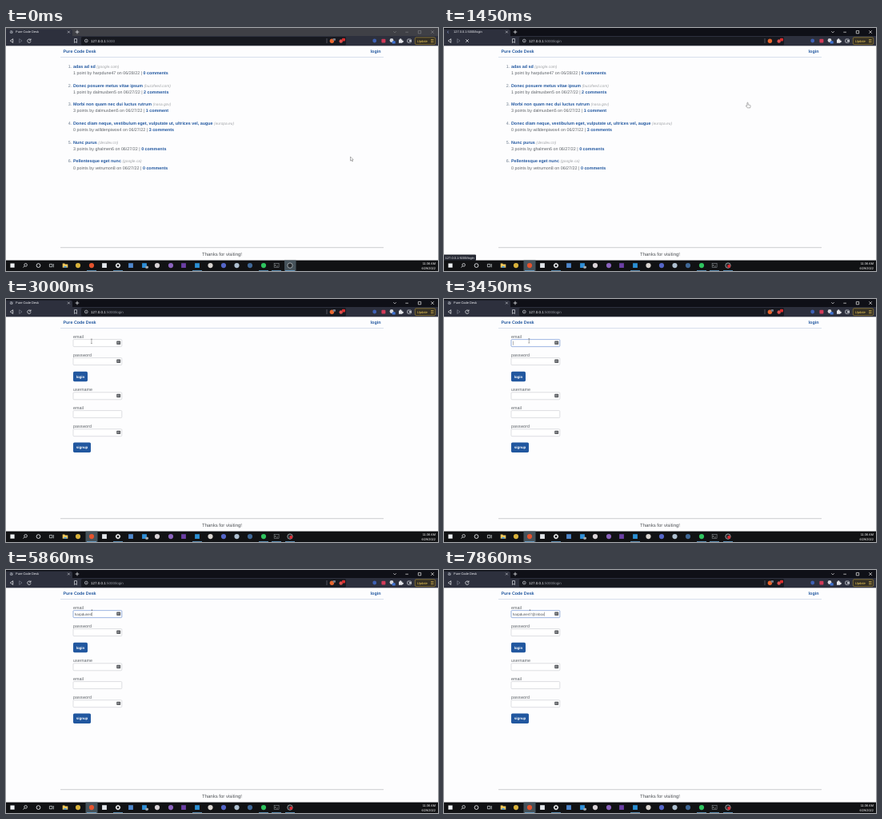
An HTML page that plays this animation: 540x304 px, repeating every 8000 ms.

```html
<!DOCTYPE html>
<html lang="en">
<head>
<meta charset="utf-8">
<title>Login walkthrough</title>
<style>
html, body { margin: 0; width: 100%; height: 100%; overflow: hidden; background: #fdfdfe; }
svg { display: block; width: 100vw; height: 100vh; }
text { font-family: "Liberation Sans", Arial, sans-serif; text-rendering: geometricPrecision; white-space: pre; }
</style>
</head>
<body>
<svg id="stage" viewBox="0 0 540 304" preserveAspectRatio="none"></svg>
<script>
const LOOP = 8000, CLICK = 1000, SWAP = 1900, LOADED = 2600, FOCUS = 3320;
const BLUE = '#21579f', GREY = '#5d6268', BRAND = 'Pure Code Desk', LOGIN_URL = '127.0.0.1:5000/login';

const rect = (x, y, w, h, fill, more = '') =>
  `<rect x="${x}" y="${y}" width="${w}" height="${h}" fill="${fill}" ${more}/>`;
const dot = (x, y, r, fill, more = '') => `<circle cx="${x}" cy="${y}" r="${r}" fill="${fill}" ${more}/>`;
const line = (d, stroke, w = .7, more = '') =>
  `<path d="${d}" fill="none" stroke="${stroke}" stroke-width="${w}" ${more}/>`;
const text = (x, y, size, fill, s, more = '') =>
  `<text x="${x}" y="${y}" font-size="${size}" fill="${fill}" ${more}>${s}</text>`;
const group = (id, ...parts) => `<g id="${id}">${parts.join('')}</g>`;
const BOLD = 'font-weight="700"', END = 'text-anchor="end"', MID = 'text-anchor="middle"';

// Browser frame
const browser = [
  rect(0, 0, 540, 11, '', 'id="tabStrip"'),
  '<path d="M0 11V1.5H80Q83 1.5 83 4V11Z" fill="#2d303d"/>',
  rect(0, 10, 540, 12.3, '#2d303d'),
  rect(94, 11, 331, 10.4, '#171920', 'rx="1.5"'),
  line('M77 3.6l2.8 2.8m0-2.8l-2.8 2.8', '#d5d7dd', .6),
  line('M86.7 5h4.6M89 2.7v4.6', '#e4e5e9', .8),
  group('controls', line('M484.3 4.2l1.7 1.7 1.7-1.7M499.3 5.2h3.6M515.3 3.4h3.4v3.4h-3.4zM531.3 3.2l3.6 3.6m0-3.6l-3.6 3.6', '#eee', .7)),
  '<path d="M5.3 16l3.4-2.4v4.8z" fill="none" stroke="#e3e4e8" stroke-width=".8"/>',
  '<path d="M20 16l-3.4-2.4v4.8z" fill="none" stroke="#777b88" stroke-width=".7"/>',
  line('M85.5 13.5h3v5l-1.5-1.2-1.5 1.2z', '#d5d7dd', .7),
  dot(100.3, 16, 1.9, 'none', 'stroke="#c9ccd3" stroke-width=".7"'),
  line('M100.3 15.6v1.4M100.3 14.7v.4', '#c9ccd3', .6),
  line('M401 13v6', '#8a8d98', .5),
  dot(407.4, 16.2, 2.7, '#e8662f'),
  group('shieldCount', rect(408.6, 13, 3.4, 2.8, '#777b86', 'rx=".7"')),
  dot(418.7, 16.5, 2.2, '#d9504e'), rect(420, 12.8, 4, 3.6, '#d92f2f', 'rx=".8"'),
  dot(460.7, 16, 2.4, '#3e61b5'), rect(469.4, 13.8, 5, 4.6, '#d23a58', 'rx="1"'),
  dot(482, 15.5, 2.4, '#d4d6dc'), rect(482.7, 16.2, 4, 3.4, '#3f73d4', 'rx=".7"'),
  '<path d="M491 14.6h1.3a1 1 0 1 1 1.8 0h1.3v1.3a1 1 0 1 1 0 1.8v1.1H491z" fill="#e5e6ea"/>',
  rect(501.8, 14, 4.6, 4.2, 'none', 'rx=".8" stroke="#d5d7dd" stroke-width=".8"'),
  rect(504, 15.3, 2.6, 1.7, '#d5d7dd'),
  rect(511.3, 11.8, 25.4, 8.8, '#342f24', 'rx="1.5" stroke="#b09439" stroke-width=".6"'),
  text(513.7, 17.7, 4.1, '#f0cc56', 'Update'),
  line('M531 14.5h3.6m-3.6 1.7h3.6m-3.6 1.7h3.6', '#f0cc56', .6),
  group('idle',
    dot(6.7, 5, 2, '#969aa5'), line('M5 4.2l1.7.8-.5 1.5M7.3 3.3l.7 1.4', '#30333e', .6),
    line('M30.7 14.8a2.2 2.2 0 1 0 .4 1.8M31 13.4v1.8h-1.8', '#e3e4e8', .8)),
  group('busy', line('M27.2 14.2l3.6 3.6m0-3.6l-3.6 3.6', '#e3e4e8', .8)),
  line('M6.7 3a2 2 0 0 1 2 2', '#8fa1d8', .7, 'id="spinner"'),
  text(12, 6.4, 3.95, '#f0f1f4', '', 'id="tabTitle"'),
  text(106, 17.6, 4.5, '#f2f2f5', '127.0.0.1<tspan id="urlRest" fill="#9497a0"></tspan>'),
].join('');

// Page furniture shared by both views
const shell = [
  rect(0, 22.3, 540, 269, '#fdfdfe'),
  line('M68 36.5H472', '#cfd9e8', .8),
  line('M68 274.7H472', '#bfc1c5', .8),
  text(71.5, 31, 5.37, BLUE, BRAND, BOLD),
  text(455.6, 31, 5.4, BLUE, 'login', BOLD),
  text(270, 284.8, 6, '#4c5054', 'Thanks for visiting!', MID),
].join('');

const posts = [
  ['adas ad sd', 'google.com', '1 point', 'harpdune47', '28', '0 comments'],
  ['Donec posuere metus vitae ipsum', 'buzzfeed.com', '1 point', 'dalmusben5', '27', '2 comments'],
  ['Morbi non quam nec dui luctus rutrum', 'nasa.gov', '3 points', 'dalmusben5', '27', '1 comment'],
  ['Donec diam neque, vestibulum eget, vulputate ut, ultrices vel, augue', 'europa.eu', '0 points', 'willdenpiwos4', '27', '3 comments'],
  ['Nunc purus', 'desdev.cn', '3 points', 'ghalmen6', '27', '0 comments'],
  ['Pellentesque eget nunc', 'google.ca', '0 points', 'vetrumon8', '27', '0 comments'],
];
const home = posts.map(([title, site, points, user, day, comments], i) => {
  const y = 49.8 + i * 23.7;
  return text(77.8, y, 5.37, '#6b7a8c', `${i + 1}.`) +
    text(84, y, 5.37, BLUE, `<tspan ${BOLD}>${title}</tspan> <tspan font-size="4.85" font-style="italic" fill="#a0a3a7">(${site})</tspan>`) +
    text(84, y + 8.2, 5.37, GREY, `${points} by ${user} on 06/${day}/22 | <tspan ${BOLD} fill="${BLUE}">${comments}</tspan>`);
}).join('');

const field = (y, label) => text(84, y - 1.8, 5.4, GREY, label) +
  rect(84, y, 60.8, 9, '#fff', 'rx="1" stroke="#d0d2d6" stroke-width=".7"');
const button = (y, w, label) => rect(84, y, w, 12.4, BLUE, 'rx="1.6"') +
  text(84 + w / 2, y + 7.8, 4.5, '#fff', label, `${BOLD} ${MID}`);
const keyIcon = y => rect(138.2, y, 5, 4.4, '#5c5f63', 'rx=".8"') +
  line(`M139.1 ${y + 2.2}h3.4`, '#e8e8e8', .8, 'stroke-dasharray=".7 .5"');
const form = [
  field(50.6, 'email'), field(73.6, 'password'), button(90.8, 18, 'login'),
  field(116.8, 'username'), field(139.6, 'email'), field(162.7, 'password'), button(179.5, 22, 'signup'),
  group('icons', ...[52.6, 75.6, 118.8, 164.7].map(keyIcon)),
  group('focusRing', rect(84, 50.6, 60.8, 9, 'none', 'rx="1" stroke="#94b2e8" stroke-width=".8"')),
  text(85.8, 56.8, 4.5, '#50545a', '', 'id="typed"'),
  rect(86, 52.7, .45, 5, '#555', 'id="caret"'),
].join('');

// Taskbar: [x, colour, shape], brand marks reduced to plain shapes
const apps = [
  [90, '#d8b13b', 'o'], [107, '#e4532d', 'o'], [123, '#e3e6ea', 's'],
  [156, '#4f87cc', 's'], [173, '#2f8fd8', 's'], [189, '#d8d2d6', 'o'], [206, '#8a63bd', 'o'],
  [222, '#6b3fa5', 's'], [239, '#2b8fd4', 's'], [255.5, '#d9d4d0', 'o'], [272, '#5566c8', 'o'],
  [288.5, '#aebfd0', 'o'], [305, '#3f6796', 'o'], [322, '#2fc45f', 'o'],
];
const taskbar = [
  rect(0, 290.6, 540, 13.4, '#111214'),
  rect(348, 290.6, 14.5, 13.4, '#45525a', 'id="recActive"'),
  rect(99.5, 290.6, 15, 13.4, '#45525a', 'id="webActive"'),
  rect(5.4, 294.5, 5.2, 5.2, '#eef1f4'),
  dot(24.6, 296.4, 1.8, 'none', 'stroke="#e5e7ea" stroke-width=".8"'), line('M23.3 297.8l-1.8 1.8', '#e5e7ea', .8),
  dot(40.5, 297.1, 2.4, 'none', 'stroke="#e5e7ea" stroke-width=".9"'),
  line('M54.4 295.4h3.4v3.4h-3.4zM59.3 295v4.4', '#dfe2e5', .7),
  '<path d="M70.7 294.4h2.5l.8 1h3.3v4.4h-6.6z" fill="#efc65a"/>', rect(72.3, 298, 3.4, 1.8, '#4a9ad8'),
  dot(140, 297.1, 2.1, 'none', 'stroke="#f0f1f3" stroke-width="1.5"'),
  line('M140 293.8v6.6M136.7 297.1h6.6', '#f0f1f3', .7), dot(140, 297.1, 1.3, '#111214'),
  ...apps.map(([x, c, s]) => s === 'o' ? dot(x, 297.1, 3.1, c) : rect(x - 2.9, 294.2, 5.8, 5.8, c)),
  dot(176, 299.3, 1.9, '#7f8890'), text(176, 300.4, 3, '#fff', '14', MID),
  rect(335.1, 294.6, 6, 5, '#17191b', 'stroke="#9aa0a5" stroke-width=".5"'),
  line('M336 296.2l1 .8-1 .8M338 298h1.6', '#ddd', .5),
  dot(355, 297.1, 3.2, '#24282b', 'stroke="#c9ced2" stroke-width=".7"'),
  dot(356.2, 298, 2, '#e02b35', 'id="recDot"'),
  line([107, 140, 239, 322, 338, 355].map(x => `M${x - 6} 303.5h12`).join(''), '#6fa9d6', .8),
  text(537, 295.8, 3.95, '#fff', '11:36 AM', END),
  text(537, 301.9, 3.95, '#fff', '6/29/2022', END),
].join('');

const status = rect(-1, 283.4, 41, 7.6, '#252833', 'rx="1"') + text(1.6, 288.7, 4, '#f0f1f4', LOGIN_URL);

const pointers = [
  group('arrow', '<path d="M0 0v5.2l1.3-1.1.9 1.9.8-.4-.9-1.8h1.6z" fill="#fff" stroke="#555" stroke-width=".45"/>'),
  group('hand', '<path d="M-.8.6q0-.9.6-.9t.6.9v1.9l2.3.5q.8.2.7 1l-.4 2.4h-3.5l-1.9-2.4q.3-.8 1.6 0z" fill="#fff" stroke="#555" stroke-width=".45"/>'),
  group('beam', line('M-1-2.7h2M0-2.7V2.7M-1 2.7h2', '#555', .45)),
  group('speck', rect(.6, -2.8, .9, 1.4, '#555')),
].join('');

stage.innerHTML = shell + group('home', home) + group('form', form) + browser +
  group('status', status) + taskbar + group('pointer', pointers);

const $ = id => document.getElementById(id);
const show = (id, on) => { $(id).style.display = on ? '' : 'none'; };
const put = (id, s) => { if ($(id).textContent !== s) $(id).textContent = s; };

const EMAIL = 'harpdune47@inbox';
const KEYS = [4680, 4820, 4910, 5050, 5180, 5360, 5450, 5680, 5860, 6180, 6860, 7180, 7360, 7450, 7640, 7860];

const linear = u => u, easeIn = u => u * u, easeOut = u => u * (2 - u), smooth = u => u * u * (3 - 2 * u);
const PATH = [
  [0, 430.5, 161, smooth], [600, 457, 29.5, linear], [1050, 457, 29.5, easeIn],
  [1450, 380, 93.5, linear], [2230, 130, 73.5, easeOut], [3150, 106.3, 52.3, linear], [LOOP, 106.3, 52.3, linear],
];
function pointerAt(t) {
  const i = PATH.findIndex((p, k) => t < PATH[k + 1][0]);
  const [t0, x0, y0, ease] = PATH[i], [t1, x1, y1] = PATH[i + 1];
  const u = ease((t - t0) / (t1 - t0));
  return [x0 + (x1 - x0) * u, y0 + (y1 - y0) * u];
}

function draw(t) {
  const focused = t >= CLICK, swapped = t >= SWAP, busy = focused && t < LOADED;
  show('home', !swapped);
  show('form', swapped);
  show('idle', !busy);
  show('busy', busy);
  show('spinner', busy);
  $('spinner').setAttribute('transform', `rotate(${t * .4 % 360} 6.7 5)`);
  show('shieldCount', !busy);
  put('tabTitle', focused && !swapped ? LOGIN_URL : BRAND);
  put('urlRest', focused ? ':5000/login' : ':5000');
  $('tabStrip').setAttribute('fill', focused ? '#0f1017' : '#3f4046');
  $('controls').style.opacity = focused ? 1 : .35;
  show('status', t >= 700 && !swapped);
  show('recActive', !focused);
  show('webActive', focused);
  show('recDot', t >= 200);

  show('icons', t >= LOADED);
  show('focusRing', t >= FOCUS);
  const count = KEYS.filter(k => k <= t).length;
  put('typed', EMAIL.slice(0, count));
  const since = t - (count ? KEYS[count - 1] : FOCUS);
  show('caret', since >= 0 && since % 1000 < 500);
  $('caret').setAttribute('x', 86 + (count ? $('typed').getComputedTextLength() : 0));

  const [x, y] = pointerAt(t);
  $('pointer').setAttribute('transform', `translate(${x} ${y})`);
  const shape = t < 560 ? 'arrow' : t < SWAP ? 'hand' : t < 2150 ? 'arrow' : t < KEYS[0] ? 'beam' : 'speck';
  for (const id of ['arrow', 'hand', 'beam', 'speck']) show(id, id === shape);
}

const start = performance.now();
(function frame() {
  draw((performance.now() - start) % LOOP);
  requestAnimationFrame(frame);
})();
</script>
</body>
</html>
```
